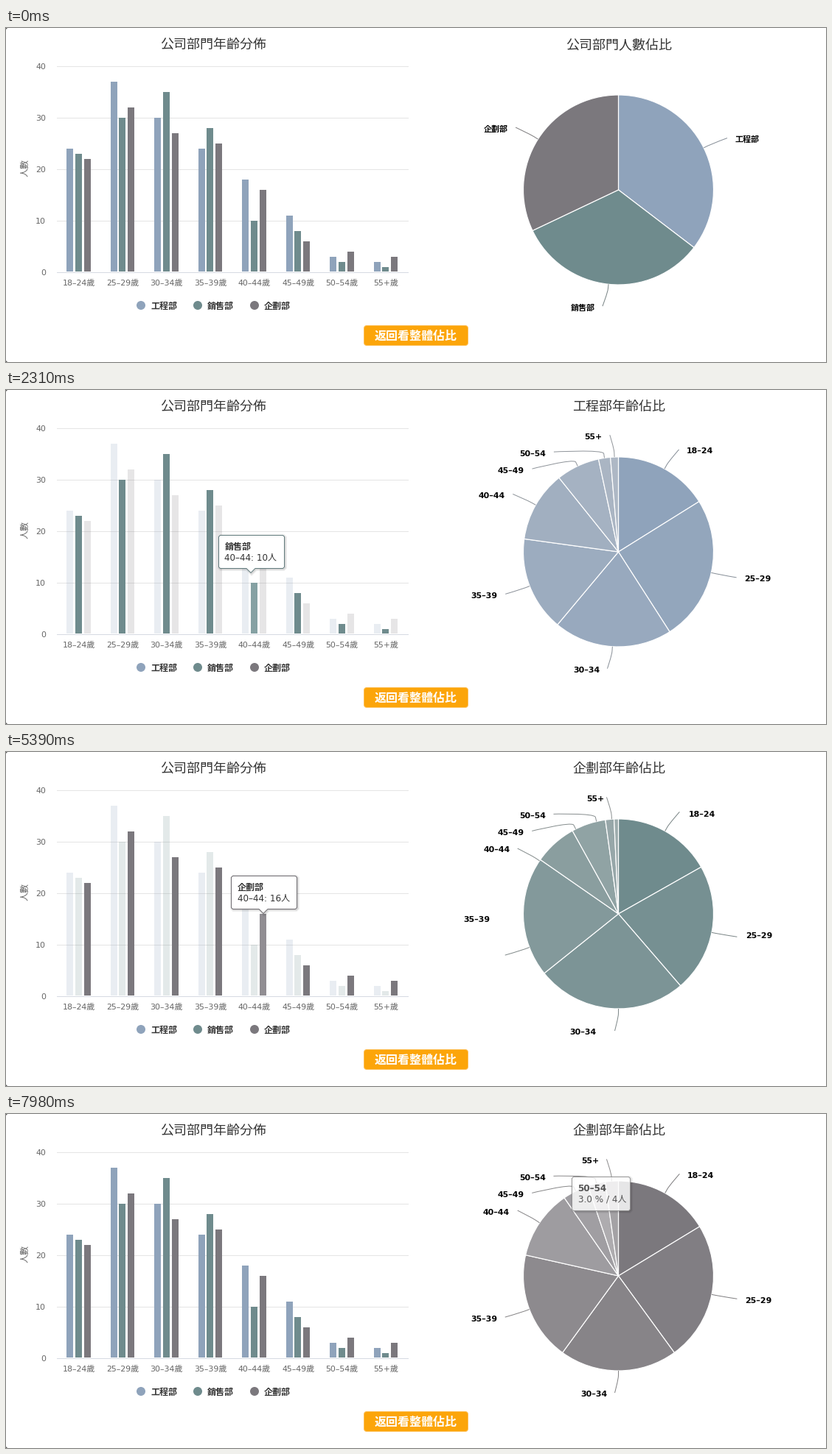
Write a matplotlib script that moves like this. It is 1112 by 454 pixels and loops after 8 s.

```python
import numpy as np
import matplotlib.pyplot as plt
from matplotlib.animation import FuncAnimation
from matplotlib.patches import Circle, FancyBboxPatch, PathPatch, Polygon, Rectangle, Wedge
from matplotlib.path import Path
from matplotlib.transforms import Affine2D

W, H, DPI = 1112, 454, 64
PX = 72 / DPI  # points per pixel
LOOP, INTERVAL, STEP = 8000, 40, 70

plt.rcParams["font.family"] = ["DejaVu Sans", "Noto Sans CJK JP"]

DEPTS = ["工程部", "銷售部", "企劃部"]
AGES = ["18–24", "25–29", "30–34", "35–39", "40–44", "45–49", "50–54", "55+"]
COUNTS = np.array([
    [24, 37, 30, 24, 18, 11, 3, 2],
    [23, 30, 35, 28, 10, 8, 2, 1],
    [22, 32, 27, 25, 16, 6, 4, 3],
])
COLORS = np.array([[143, 163, 187], [111, 139, 141], [123, 120, 125]]) / 255

# Timeline in ms
HOVERS = [(1050, 0), (2240, 1), (5250, 2)]
LEAVE, FADE = 6440, 210
DRILLS = [(1750, 0), (3640, 1), (5390, 2)]
MORPH = 520
PIE_HOVER, PIE_TIP = 7770, 7910

CX, CY, R, REACH = 830.5, 220, 129, 159
LABEL_GAP = 23

fig = plt.figure(figsize=(W / DPI, H / DPI), dpi=DPI, facecolor="white")
ax = fig.add_axes([0, 0, 1, 1])
ax.set(xlim=(0, W), ylim=(H, 0))
ax.axis("off")


def text(x, y, s, size=11, color="#666666", ha="center", **kw):
    return ax.text(x, y, s, fontsize=size * PX, color=color, ha=ha,
                   va=kw.pop("va", "baseline"), zorder=kw.pop("zorder", 5), **kw)


def mix(a, b, k):
    return a + (b - a) * k


def lighten(rgb, amount):
    return np.clip(np.asarray(rgb) + amount / 255, 0, 1)


# ---- bar chart ----
def bar_left(age, dept):
    return round(98.75 + 59.5 * age - 16.7 + 11.9 * dept)


def bar_top(age, dept):
    return 332 - 7 * COUNTS[dept, age]


def draw_bar_chart():
    text(281, 28, "公司部門年齡分佈", 18, "#333333")
    text(26, 190, "人數", 12, rotation=90, va="center")
    for v in range(0, 50, 10):
        y = 331.5 - 7 * v
        ax.plot([69, 545], [y, y], color="#e4e4e4" if v else "#d6dae2", lw=PX, zorder=1)
        text(54, y + 4.5, str(v), ha="right")
    for i, age in enumerate(AGES):
        text(98.75 + 59.5 * i, 350, age + "歲")
    for d, name in enumerate(DEPTS):
        ax.add_patch(Circle((183 + 77 * d, 377), 6, fc=COLORS[d], ec="none"))
        text(196 + 77 * d, 382, name, 12, "#333333", "left", weight="bold")
    return [[ax.add_patch(Rectangle((bar_left(i, d), bar_top(i, d)), 9, 331 - bar_top(i, d),
                                    fc=COLORS[d], ec="none", zorder=2))
             for i in range(len(AGES))] for d in range(len(DEPTS))]


def draw_button():
    ax.add_patch(FancyBboxPatch((485.5, 404.5), 141, 27, boxstyle="round,pad=0,rounding_size=4",
                                fc="#fca50a", ec="#fdc05a", lw=PX))
    text(555.5, 424, "返回看整體佔比", 16, "white", weight="bold")
    for y, s in ((0, 1), (H, -1)):
        ax.add_patch(Polygon([(0, y), (2, y), (0, y + 2 * s)], fc="#555555", ec="none"))


# ---- tooltip ----
class Tip:
    def __init__(self, w, h, arrow=None):
        pts = [(2, 0), (w - 2, 0), (w, 2), (w, h - 2), (w - 2, h)]
        if arrow:
            pts += [(arrow + 6, h), (arrow, h + 6), (arrow - 6, h)]
        pts += [(2, h), (0, h - 2), (0, 2)]
        self.move = Affine2D()
        tr = self.move + ax.transData
        shift = Affine2D().translate(1, 1) + tr
        self.parts = []
        for lw in (5, 3, 1):
            shade = Polygon(pts, fill=False, ec="black", lw=lw * PX, zorder=9)
            self.add(shade, 0.06, shift)
        self.box = Polygon(pts, fc="white", ec="#888888", lw=PX, zorder=10)
        self.add(self.box, 1, tr)
        style = dict(size=12, color="#333333", ha="left", zorder=11)
        self.head = text(8, 19.6, "", weight="bold", **style)
        self.body = text(8, 34.4, "", **style)
        for t in (self.head, self.body):
            t.set_transform(tr)
            self.parts.append((t, 1))

    def add(self, patch, alpha, tr):
        ax.add_patch(patch)
        patch.set_transform(tr)
        self.parts.append((patch, alpha))

    def show(self, x, y, head, body, color, alpha):
        self.move.clear().translate(x, y)
        self.head.set_text(head)
        self.body.set_text(body)
        self.box.set_edgecolor(color)
        for part, a in self.parts:
            part.set_visible(alpha > 0)
            part.set_alpha(a * alpha)

    def hide(self):
        for part, _ in self.parts:
            part.set_visible(False)


# ---- pie ----
def label_points(mids):
    """Label anchors on the outer circle, pushed apart down the left side."""
    out, last = [None] * len(mids), -99
    for i in reversed(range(len(mids))):
        y = CY - REACH * np.cos(2 * np.pi * mids[i])
        side = 1
        if mids[i] >= 0.5:
            side = -1
            y = last = max(y, last + LABEL_GAP)
        out[i] = (CX + side * np.sqrt(max(REACH**2 - (CY - y)**2, 0)), y, side)
    return np.array(out)


def pie_state(dept):
    if dept is None:
        values, names, colors = COUNTS.sum(axis=1), DEPTS, COLORS
        title = "公司部門人數佔比"
    else:
        values, names = COUNTS[dept], AGES
        colors = np.array([mix(COLORS[dept], 0.81, 0.07 * i) for i in range(len(AGES))])
        title = DEPTS[dept] + "年齡佔比"
    edges = np.concatenate([[0], np.cumsum(values)]) / values.sum()
    mids = (edges[1:] + edges[:-1]) / 2
    return dict(title=title, names=names, colors=colors, edges=edges,
                mids=mids, labels=label_points(mids))


def connector(mid, label):
    a = 2 * np.pi * mid
    rim, knee, ctrl = [(CX + r * np.sin(a), CY - r * np.cos(a)) for r in (R, R + 6, R + 12)]
    start = (label[0] + 5 * label[2], label[1])
    return Path([start, start, ctrl, knee, rim], [1, 4, 4, 4, 2])


bars = draw_bar_chart()
draw_button()
bar_tip, pie_tip = Tip(89, 45, 43.5), Tip(79, 46)
PIES = {d: pie_state(d) for d in (None, 0, 1, 2)}
pie_title = text(831, 28, "", 18, "#333333")
slices, links, tags = [], [], []
for _ in AGES:
    slices.append(ax.add_patch(Wedge((CX, CY), R, 0, 1, ec="white", lw=1.2 * PX, zorder=3)))
    links.append(ax.add_patch(PathPatch(Path([(0, 0), (1, 1)]), fill=False, lw=PX, zorder=4)))
    tags.append(text(0, 0, "", 11, "black", weight="bold"))


def update_bars(t):
    past = [h for h in HOVERS if h[0] <= t]
    if not past or t >= LEAVE + FADE:
        active, fade = None, 0
    else:
        start, active = past[-1]
        fade = 1 - np.clip((t - LEAVE) / FADE, 0, 1)
    for d, row in enumerate(bars):
        dim = 0.81 * fade if active not in (None, d) else 0
        for i, bar in enumerate(row):
            hot = 22 * fade if active == d and i == 4 else 0
            bar.set_facecolor(lighten(COLORS[d], hot))
            bar.set_alpha(1 - dim)
    if active is None:
        bar_tip.hide()
        return
    x, y = bar_left(4, active) - 39, bar_top(4, active) - 52
    n = (t - start) / 33
    if active and n < 4:
        x0, y0 = bar_left(4, active - 1) - 39, bar_top(4, active - 1) - 52
        x = mix(x, x0, (2 / 3)**n)
        y = mix(y, y0, 0.5**n)
    bar_tip.show(round(x) + 0.5, round(y) + 0.5, DEPTS[active],
                 f"{AGES[4]}: {COUNTS[active, 4]}人", COLORS[active] * 0.9, fade)


def update_pie(t):
    past = [d for d in DRILLS if d[0] <= t]
    start, dept = past[-1] if past else (0, None)
    now = PIES[dept]
    old, k = now, 1
    if dept:
        old = PIES[dept - 1]
        k = 0.5 - 0.5 * np.cos(np.pi * min((t - start) / MORPH, 1))
    edges, labels, colors = [mix(old[key], now[key], k) for key in ("edges", "labels", "colors")]
    glow = {4: 12, 5: 8, 6: 16} if t >= PIE_HOVER else {}
    pie_title.set_text(now["title"])
    n = len(now["names"])
    for i, (piece, link, tag) in enumerate(zip(slices, links, tags)):
        for part in (piece, link, tag):
            part.set_visible(i < n)
        if i >= n:
            continue
        piece.set_theta1(360 * edges[i] - 90)
        piece.set_theta2(360 * edges[i + 1] - 90)
        piece.set_facecolor(lighten(colors[i], glow.get(i, 0)))
        link.set_path(connector(now["mids"][i], now["labels"][i]))
        link.set_edgecolor(mix(colors[i], 0.5, 0.6))
        x, y, _ = labels[i]
        side = now["labels"][i][2]
        tag.set_position((x + 15.5 * side, y + 5.5))
        tag.set_ha("left" if side > 0 else "right")
        tag.set_text(now["names"][i])
    if t >= PIE_TIP:
        share = 100 * COUNTS[2, 6] / COUNTS[2].sum()
        pie_tip.show(767.5, 85.5, AGES[6], f"{share:.1f} % / {COUNTS[2, 6]}人", "#8c8c8c",
                     0.5 if t < PIE_TIP + STEP else 0.82)
    else:
        pie_tip.hide()


def update(i):
    t = (INTERVAL * i + INTERVAL - 1) // STEP * STEP
    update_bars(t)
    update_pie(t)
    return []


anim = FuncAnimation(fig, update, frames=LOOP // INTERVAL, interval=INTERVAL,
                     init_func=lambda: update(0), repeat=True, repeat_delay=0, blit=False)
plt.show()
```
